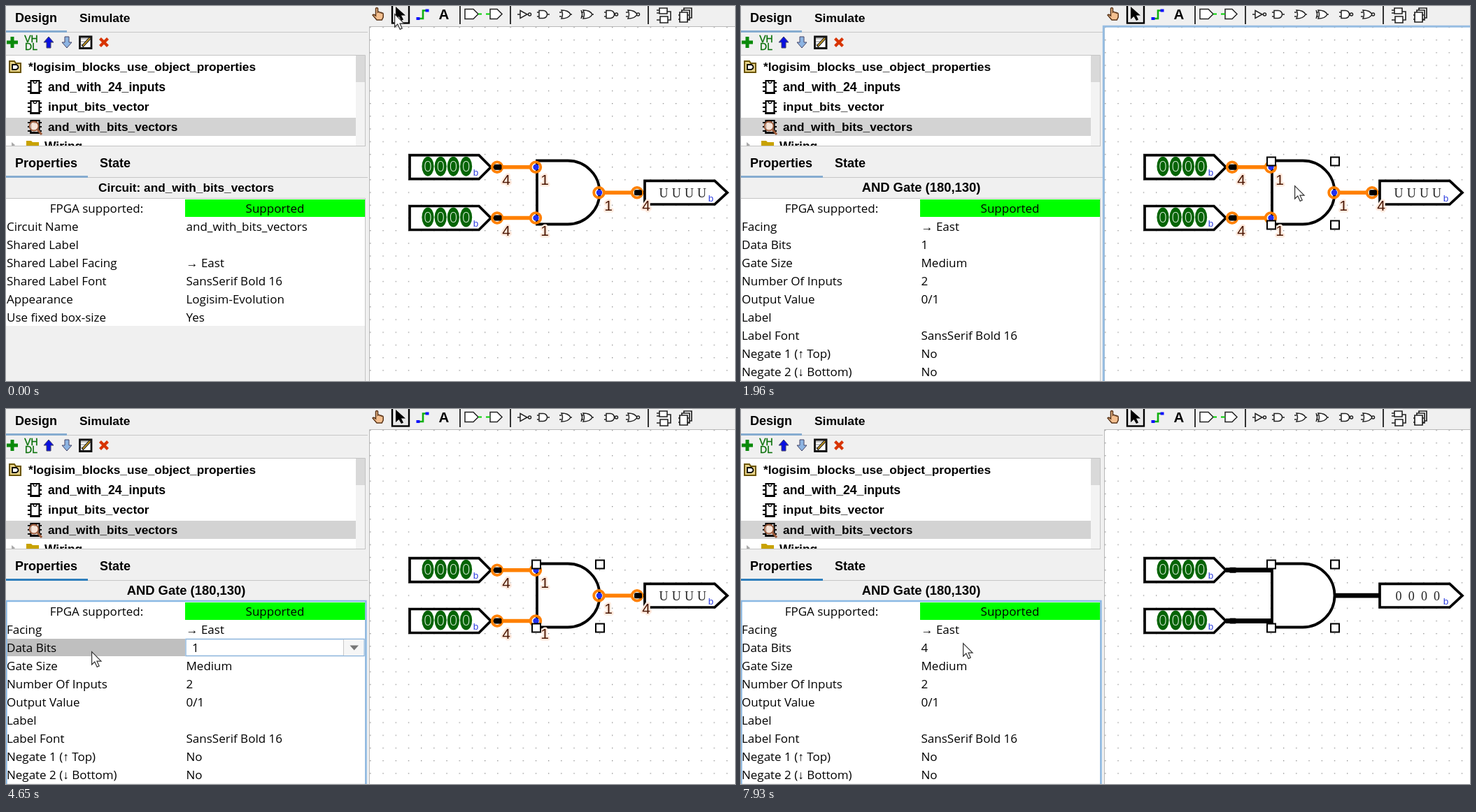
Animation of 1042 by 537 pixels, one loop 8000 ms. Source, as an HTML page:

```html
<!DOCTYPE html>
<html lang="en">
<head>
<meta charset="utf-8">
<title>Setting the data bits of a gate</title>
<style>
html, body { margin: 0; width: 100%; height: 100%; overflow: hidden; background: #f0f0f0; }
svg { display: block; width: 100%; height: 100%; }
text { white-space: pre; }
.bold { font-family: "Liberation Sans", Arial, sans-serif; font-weight: 700; }
.row { font: 17px "Open Sans", "Liberation Sans", sans-serif; }
.digit { font: 300 20px "Open Sans", sans-serif; text-anchor: middle; }
.out { font: 18px "Liberation Serif", serif; text-anchor: middle; fill: #222; }
.width { font: 21px "Liberation Sans", Arial, sans-serif; text-anchor: middle; fill: #4a1703;
  stroke: #ffeade; stroke-width: 5; stroke-linejoin: round; paint-order: stroke; }
.mid { text-anchor: middle; }
</style>
</head>
<body>
<svg id="stage" viewBox="0 0 1042 537"></svg>
<script>
const LOOP = 8000;
const rect = (x, y, w, h, fill, more = '') =>
  `<rect x="${x}" y="${y}" width="${w}" height="${h}" fill="${fill}" ${more}/>`;
const path = (d, more = '') => `<path d="${d}" ${more}/>`;
const stroke = (d, width, color = '#000', fill = 'none') =>
  path(d, `fill="${fill}" stroke="${color}" stroke-width="${width}"`);
const text = (x, y, cls, str, more = '') => `<text x="${x}" y="${y}" class="${cls}" ${more}>${str}</text>`;
const bold = (x, y, size, str, cls = '') => text(x, y, 'bold ' + cls, str, `font-size="${size}"`);
const group = (id, body) => `<g id="${id}">${body}</g>`;
const at = (x, y, body) => `<g transform="translate(${x} ${y})">${body}</g>`;
const each = (list, fn) => list.map(fn).join('');

const ARROW = 'M.6 .6V19L4.8 15L8.2 22.4L11.2 21L8 14.2H14Z';

// Explorer pane
function chip(y) {
  return at(31, y, each([3, 9, 15], p => rect(0, p, 20, 2, '#000'))
    + stroke('M4.5 1H16.5V19H4.5Z', 2.2, '#000', '#fff') + rect(3.5, 17, 14, 3, '#000')
    + stroke('M8 2a2.5 2.5 0 0 0 5 0', 1.3));
}

function explorer() {
  const blueArrow = (x, color, turn) =>
    `<g transform="translate(${x} 52) rotate(${turn})">${stroke('M0 -8L7 0H3V8H-3V0H-7Z', 1, '#446', color)}</g>`;
  return rect(0, 0, 517, 537, '#f0f0f0')
    + rect(0, 37, 517, 1, '#c6c6c6') + rect(0, 35, 87, 3, '#86acd0')
    + bold(13, 23, 18, 'Design') + bold(105, 23, 17.4, 'Simulate')
    + stroke('M9 44V60M1 52H17', 5, '#0a8a0a')
    + each([['VH', 51.5], ['DL', 63]], ([s, y]) => text(36, y, 'mid', s,
      'font-family="Liberation Sans, sans-serif" font-size="14" fill="#087008" stroke="#087008" stroke-width=".4"'))
    + blueArrow(61, '#0a10e0', 0) + blueArrow(87, '#8db4e2', 180)
    + stroke('M105.5 44H122V60.5H105.5Z', 2.8, '#111', '#fff')
    + stroke('M107 47H121M107 51H118M107 55H114', 1, '#888')
    + stroke('M109 58L121 45', 3.8, '#222') + stroke('M110 57L120 46', 1.6, '#d9a520')
    + stroke('M134.5 46.5L145.5 57.5M145.5 46.5L134.5 57.5', 4.2, '#d83400')
    + rect(0, 70, 513, 130, '#fff') + rect(0, 160, 500, 26, '#d3d3d3')
    + rect(500, 70, 13, 130, '#f3f3f3') + rect(500, 70, 13, 39, '#d9d9d9')
    + stroke('M5 79H12L14 82H21V95H5Z', 2, '#6b5500', '#e8d48a') + stroke('M9 84H14a3.5 3.5 0 0 1 0 7H9Z', 1.8, '#000', '#fff')
    + bold(32, 93, 17.25, '*logisim_blocks_use_object_properties')
    + chip(106) + chip(135) + chip(163)
    + `<circle cx="40" cy="172" r="6.5" fill="#f6dfcf" fill-opacity=".8" stroke="#9a5a3a" stroke-width="1.8"/>`
    + stroke('M45 177L51 184', 3, '#9a5a3a')
    + bold(60, 122, 17.6, 'and_with_24_inputs') + bold(60, 150, 17.35, 'input_bits_vector') + bold(60, 179, 17.2, 'and_with_bits_vectors')
    + `<svg x="0" y="188" width="500" height="12">${path('M8 7L13 11L8 15Z', 'fill="#aaa"')}${
        path('M29 5H36L38 7H47V18H29Z', 'fill="#c8a200"')}${bold(55, 18.5, 17.5, 'Wiring')}</svg>`
    + stroke('M0 70.5H513.5V200', 1, '#c4c4c4') + rect(0, 200, 514, 1, '#c4c4c4');
}

// Properties pane
const cells = (rows, x) => each(rows, (s, i) => text(x, 322 + 26 * i, 'row', s));
const table = (id, title, size, names, values) => group(id,
  rect(0, 276, 513, 26 * (names.length + 1), '#fff')
  + bold(257.5, 266, size, title, 'mid') + cells(names, 1) + cells(values, 257.5));

function properties() {
  return rect(0, 245, 517, 1, '#c6c6c6') + rect(0, 243, 117, 3, '#86acd0', 'id="tabLine"')
    + bold(13, 231, 18, 'Properties') + bold(134, 231, 18, 'State')
    + table('circuitTable', 'Circuit: and_with_bits_vectors', 17.25,
      ['Circuit Name', 'Shared Label', 'Shared Label Facing', 'Shared Label Font', 'Appearance', 'Use fixed box-size'],
      ['and_with_bits_vectors', '', '→ East', 'SansSerif Bold 16', 'Logisim-Evolution', 'Yes'])
    + table('gateTable', 'AND Gate (180,130)', 18.4,
      ['Facing', 'Data Bits', 'Gate Size', 'Number Of Inputs', 'Output Value', 'Label', 'Label Font', 'Negate 1 (↑ Top)', 'Negate 2 (↓ Bottom)'],
      ['→ East', '<tspan id="bits">1</tspan>', 'Medium', '2', '0/1', '', 'SansSerif Bold 16', 'No', 'No'])
    + rect(256, 277, 257, 25, '#0f0')
    + text(129.5, 296, 'row mid', 'FPGA supported:') + text(384.5, 296, 'row mid', 'Supported')
    + group('editor', rect(0, 329, 256, 25, '#bfbfbf') + text(1, 348, 'row', 'Data Bits')
      + stroke('M257 329.5H512V353.5H257Z', 1.4, '#8bb4dc', '#fff') + rect(483, 330.2, 28.3, 22.6, '#f6f6f6')
      + stroke('M482.5 330V353', 1, '#c8c8c8') + path('M491.5 338.5H504L497.7 345.5Z', 'fill="#777"')
      + rect(266, 331, 10.5, 21, '#2675bf', 'id="selection"')
      + text(266, 348, 'row', '1', 'id="field"') + rect(266, 331, 1, 21, '#000', 'id="caret"'))
    + stroke('M0 275.5H513.5V537', 1, '#c4c4c4')
    + group('tableFocus', stroke('M.5 537V275H514.5V537', 2.4, '#8bb9e4'));
}

// Toolbar above the canvas
function toolbar() {
  const andShape = 'M-6 -5.5H0a5.5 5.5 0 0 1 0 11H-6Z';
  const orShape = 'M-6 -6Q4 -6 7 0Q4 6 -6 6Q-3 0 -6 -6Z';
  const bubble = 'M6.5 0a2 2 0 1 0 4 0a2 2 0 1 0 -4 0';
  const leads = 'M-9 -3H-6M-9 3H-6M6 0H9';
  const gates = [
    [740, 'M-5 -5.5L5 0L-5 5.5ZM-9 0H-5' + bubble], [768, andShape + leads], [800, orShape + leads],
    [831, orShape + leads + 'M-9 -6Q-6 0 -9 6'], [864, andShape + bubble + 'M-9 -3H-6M-9 3H-6'],
    [895, orShape + bubble + 'M-9 -3H-6M-9 3H-6']];
  const sheet = (x, y) => stroke(`M${x} ${y}h11v14h-11Z`, 1.7, '#222', '#fff');
  return rect(517, 0, 525, 29, '#f0f0f0')
    + stroke('M528.5 14V3.5q1.5 -2 3 0V9q2 -1.5 3 .5q2 -1 2.5 .8q2 -.8 2.2 1.2V16l-2 4H530L524 13q1 -2 4.5 1Z', 1.5, '#5a3418', '#f4c090')
    + rect(552, -3, 24, 27.5, '#e8e8e8', 'stroke="#000" stroke-width="2.4"')
    + path('M557 1V19L561.5 15L565 21L568 19.5L565 13.5H571Z')
    + stroke('M589 18H596V6.5H602', 2.6, '#10b010')
    + each([[589, 18], [602, 6.5]], ([x, y]) => rect(x - 2.5, y - 2, 5, 4, '#1010ff'))
    + bold(626, 19, 20.5, 'A', 'mid')
    + each([648, 720, 917], x => rect(x, 0, 2, 26, '#333'))
    + stroke('M656 4.5H668L675 11.5L668 18.5H656Z', 1.5, '#222', '#fff') + stroke('M675 11.5H680', 2, '#00d000')
    + stroke('M692 4.5H702L709 11.5L702 18.5H692Z', 1.5, '#222', '#fff') + stroke('M686 11.5H692', 2, '#00d000')
    + each(gates, ([x, d]) => at(x, 12, stroke(d, 1.5, '#222', '#fff')))
    + at(940, 12, stroke('M-6 -9H5V-1H-6ZM-5 3H6V12H-5ZM-10 -6H-6M5 -4H10V8H6M-10 8H-5M-10 -2H-6', 1.6, '#222', '#fff'))
    + at(971, 12, sheet(-2, -9) + sheet(-5, -6) + sheet(-8, -3)
      + stroke('M-10 1H-8M-10 7H-8M3 1H5M3 7H5', 1.6, '#222'));
}

// Circuit
const CELL = 18.2;
const ring = (x, y) => `<circle cx="${x}" cy="${y}" r="7.3" fill="none" stroke="#ff8000" stroke-width="3.8"/>`;
const dot = (x, y) => `<circle cx="${x}" cy="${y}" r="4.2" fill="#2030f0"/>`;
const stub = (x, y) => rect(x - 5.5, y - 4, 11, 8, '#000', 'rx="2"');
const base = (x, y) => text(x, y, 'mid', 'b', 'font-family="Liberation Sans, sans-serif" font-size="13.5" fill="#3040e0"');

function inputPin(y) {
  return at(0, y, stroke('M577 -17H676L693 0L676 17H577Z', 3.7, '#000', '#fff')
    + each([0, 1, 2, 3], i => {
      const x = 603 + CELL * i;
      return `<ellipse cx="${x}" cy="-1" rx="8.6" ry="14" fill="#056405"/>` + text(x, 6.2, 'digit', '0', 'fill="#e4f2e4"');
    }) + base(671.5, 12.5));
}

function canvas() {
  const bad = y => stroke(`M693 ${y}H702`, 4) + stroke(`M709 ${y}H750`, 5.4, '#ff8000')
    + ring(702, y) + stub(703, y) + ring(757, y) + dot(757.5, y);
  const labels = [['4', 715, 256], ['1', 770, 256], ['4', 715, 329], ['1', 770, 329], ['1', 861, 293], ['4', 915, 293]];
  const digits = (id, s) => group(id, each([0, 1, 2, 3], i => text(940 + CELL * i, 274, 'out', s)));
  return rect(520, 30, 522, 507, '#fff')
    + `<defs><pattern id="grid" x="520.2" y="29.8" width="${CELL}" height="${CELL}" patternUnits="userSpaceOnUse">${
        rect(0, 0, 1.3, 1.3, '#8a8a8a')}</pattern></defs>` + rect(520, 30, 522, 507, 'url(#grid)')
    + inputPin(230.7) + inputPin(303.5)
    + stroke('M913 250.3H1013L1031 267.2L1013 284H913Z', 3.7, '#000', '#fff')
    + digits('unknown', 'U') + digits('zeros', '0') + base(1007.5, 280)
    + stroke('M759 221.5H803A45.5 45.5 0 0 1 803 312.5H759Z', 3.8, '#000', '#fff')
    + group('goodWires', stroke('M693 230.7H759M693 303.5H759M848 267.2H913', 6.8) + stub(703, 230.7) + stub(703, 303.5))
    + group('badWires', bad(230.7) + bad(303.5) + stroke('M855 267.2H896', 5.4, '#ff8000') + stroke('M905 267.2H913', 4)
      + ring(847.5, 267.2) + dot(848, 267.2) + ring(902, 267.2) + stub(903.5, 267.2)
      + each(labels, ([s, x, y]) => text(x, y, 'width', s)))
    + group('handles', each([[758, 222.5], [849, 222.5], [758, 313.5], [849, 313.5]],
      ([x, y]) => rect(x - 6, y - 6, 12, 12, '#fff', 'stroke="#000" stroke-width="2"')))
    + stroke('M519.5 537V29.5H1042', 1, '#b8b8b8')
    + group('canvasFocus', stroke('M518.3 537V29.2H1042', 3, '#97bde2'));
}

const pointer = group('pointer',
  '<circle id="halo" cx="-1" cy="0" r="15.5" fill="#fff200" fill-opacity=".6"/>'
  + path(ARROW, 'id="arrow" fill="#fff" stroke="#333" stroke-width="1.2"')
  + group('ibeam', stroke('M-5 -10H-1.5L0 -9L1.5 -10H5M-5 10H-1.5L0 9L1.5 10H5M0 -9V9', 1.8, '#3a3a20')));

document.getElementById('stage').innerHTML = explorer() + properties() + toolbar() + canvas() + pointer;

// Pointer moves: first step, last step, number of steps, end point
const moves = [
  [480, 690, 4, 741, 139], [1020, 1570, 9, 791, 257], [2890, 3640, 12, 341, 349],
  [3700, 3840, 3, 319, 337], [4310, 4650, 6, 122, 347], [4720, 4850, 3, 90, 353],
  [4920, 5050, 3, 67, 345], [5120, 5590, 8, 310, 342], [5790, 5920, 2, 241, 341],
  [7930, 7930, 1, 317, 335]];

function pointerAt(t) {
  let x = 554.5, y = 10.5;
  for (const [from, to, steps, endX, endY] of moves) {
    if (t < from) break;
    const gap = steps > 1 ? (to - from) / (steps - 1) : 1;
    const p = Math.min(1, (Math.floor((t - from) / gap + 0.01) + 1) / steps);
    const eased = p * p * (3 - 2 * p);
    x += (endX - x) * eased;
    y += (endY - y) * eased;
  }
  return [Math.round(x), Math.round(y)];
}

const ui = {};
document.querySelectorAll('[id]').forEach(el => ui[el.id] = el);
const show = (id, on) => ui[id].style.display = on ? '' : 'none';

function draw(t) {
  const within = (a, b) => t >= a && t < b;
  const [x, y] = pointerAt(t);
  const selected = t >= 1890, tableActive = t >= 3970, done = t >= 7110;
  const marked = within(5920, 6710), typed = t >= 6710;
  const beam = within(5790, 6120) || (within(3900, 6120) && x > 257);

  ui.pointer.setAttribute('transform', `translate(${x} ${y})`);
  show('arrow', !beam);
  show('ibeam', beam);
  show('halo', within(70, 210) || within(1830, 1960) || within(3900, 4050) || within(5660, 5990));

  show('circuitTable', !selected);
  show('gateTable', selected);
  show('handles', selected);
  show('canvasFocus', within(140, 3970));
  show('tableFocus', tableActive);
  ui.tabLine.setAttribute('fill', tableActive ? '#2f7fbd' : '#86acd0');

  show('editor', tableActive && !done);
  show('selection', marked);
  show('caret', within(5920, 6380) || typed);
  ui.caret.setAttribute('x', typed ? 276 : 266);
  ui.field.textContent = typed ? '4' : '1';
  ui.field.setAttribute('fill', marked ? '#fff' : '#000');
  ui.bits.textContent = done ? '4' : '1';

  show('badWires', !done);
  show('unknown', !done);
  show('goodWires', done);
  show('zeros', done);
}

const start = performance.now();
function tick() {
  draw((performance.now() - start) % LOOP);
  requestAnimationFrame(tick);
}
tick();
</script>
</body>
</html>
```
